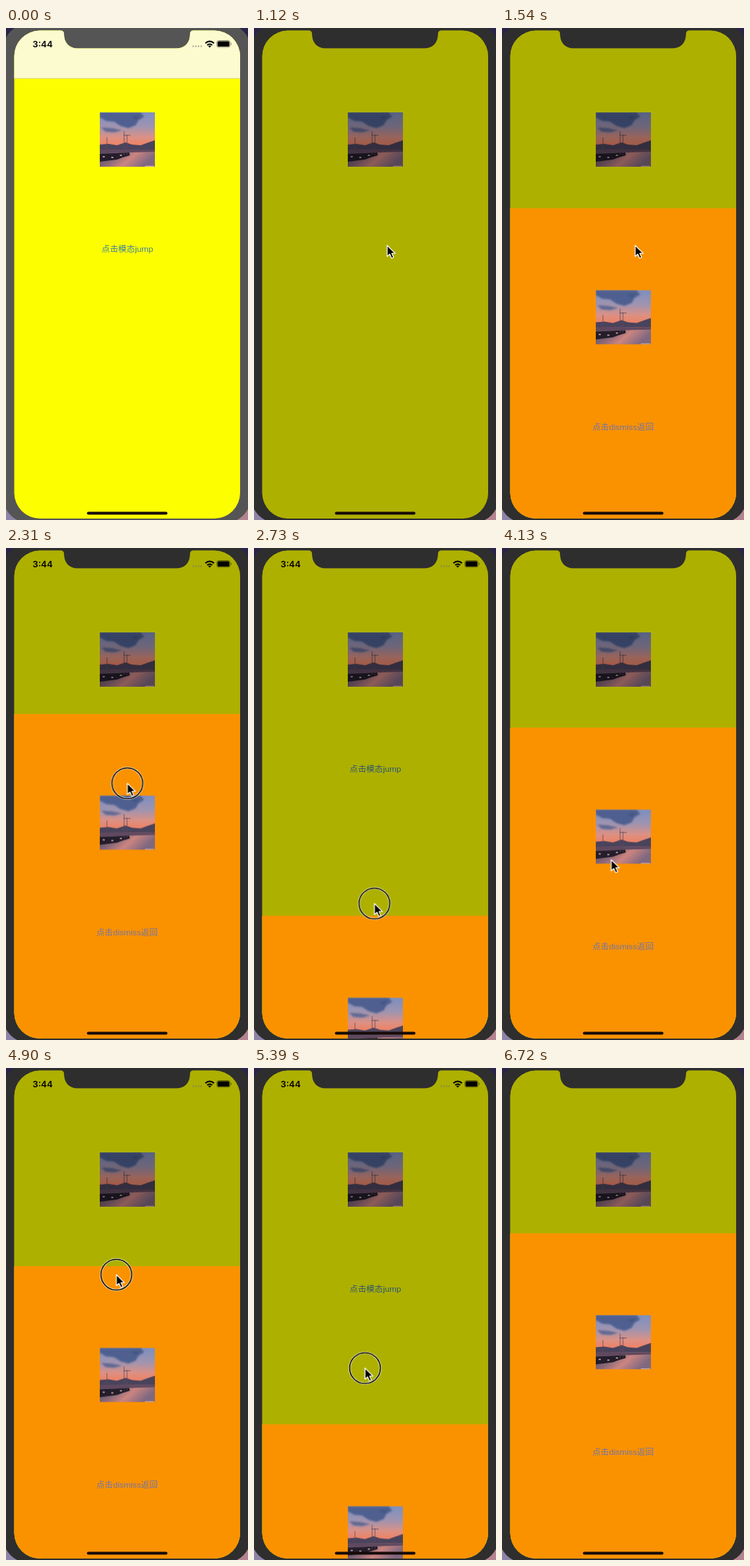
An HTML page that plays this animation: 338 px wide and 688 px high, repeating every 6.79 s.

```html
<!DOCTYPE html>
<html lang="zh-CN">
<head>
<meta charset="utf-8">
<title>Modal drag</title>
<style>
  html, body { margin: 0; width: 100%; height: 100%; overflow: hidden; background: #2a2448; }
  svg { display: block; }
  .label { font: 11.7px "Liberation Sans", "Noto Sans CJK SC", "Noto Sans CJK", sans-serif; text-anchor: middle; }
  .clock { font: 600 12.4px Inter, "Liberation Sans", sans-serif; }

  /* All parts share one 6790 ms loop. */
  .bezel, .nav, .dim, .status, .jump, .ring { animation: 6790ms step-end infinite; }
  .sheet, .pointer { animation: 6790ms linear infinite; }
  .bezel { animation-name: bezel; }
  .nav { animation-name: nav; }
  .dim { animation-name: dim; }
  .status { animation-name: status; }
  .jump { animation-name: jump; }
  .ring { animation-name: ring; }
  .sheet { animation-name: sheet; }
  .pointer { animation-name: pointer; }

  @keyframes bezel { 0% { fill: #555; } 7.2%, 100% { fill: #2e2e2e; } }
  @keyframes nav {
    0%, 45.36% { opacity: 1; }
    16.35%, 54.49%, 100% { opacity: 0; }
  }
  @keyframes dim {
    0%, 45.36% { opacity: 0; }
    16.35%, 54.49%, 100% { opacity: .31; }
  }
  @keyframes status {
    0%, 33.5%, 70.7% { opacity: 1; }
    16.35%, 54.49%, 83%, 100% { opacity: 0; }
  }
  @keyframes jump {
    0%, 33.5%, 70.7% { opacity: 1; }
    14.3%, 51.5% { opacity: .22; }
    16.35%, 54.49%, 83%, 100% { opacity: 0; }
  }
  @keyframes ring {
    0%, 15.4%, 42.42%, 53%, 82.47%, 100% { opacity: 0; }
    14.3%, 33%, 51.5%, 69.7% { opacity: 1; }
  }
  @keyframes sheet {
    0% { transform: translateY(457px); }
    16.5% { transform: translateY(457px); animation-timing-function: ease-in-out; }
    23.8%, 33.4% { transform: translateY(0); }
    34.02% { transform: translateY(.6px); animation-timing-function: ease-in-out; }
    42.42% { transform: translateY(330px); animation-timing-function: ease-out; }
    45.36% { transform: translateY(457px); }
    54.64% { transform: translateY(457px); animation-timing-function: ease-in-out; }
    61.92%, 70.69% { transform: translateY(0); }
    79.38% { transform: translateY(267px); }
    82.47% { transform: translateY(310px); animation-timing-function: ease-out; }
    87.6%, 100% { transform: translateY(0); }
  }
  @keyframes pointer {
    0%, 5% { transform: translate(360px, 470px); animation-timing-function: ease-out; }
    12%, 24% { transform: translate(186px, 304px); animation-timing-function: ease-in-out; }
    31%, 34.02% { transform: translate(169.5px, 329px); animation-timing-function: ease-in-out; }
    42.42% { transform: translate(168px, 525px); }
    44% { transform: translate(168px, 525px); animation-timing-function: ease-in-out; }
    50%, 54.5% { transform: translate(177px, 306px); animation-timing-function: ease-in-out; }
    60.82% { transform: translate(152.5px, 436px); animation-timing-function: ease-in-out; }
    67%, 70.69% { transform: translate(154px, 262px); }
    79.38% { transform: translate(155px, 419.5px); }
    82.47%, 86% { transform: translate(156px, 445px); animation-timing-function: ease-in; }
    92.8%, 100% { transform: translate(360px, 380px); }
  }
</style>
</head>
<body>
<svg width="338" height="688" viewBox="0 0 338 688">
  <defs>
    <clipPath id="screen">
      <path d="M47 3.5H76Q81 3.5 81 8.5C81 20.5 88 28.5 100 28.5H238C250 28.5 257 20.5 257 8.5Q257 3.5 262 3.5H291A36 36 0 0 1 327 39.5V650A36 36 0 0 1 291 686H47.5A36 36 0 0 1 11.5 650V39.5A36 36 0 0 1 47 3.5Z"/>
    </clipPath>
    <linearGradient id="sky" x2="0" y2="1">
      <stop stop-color="#7d8fc0"/>
      <stop offset=".4" stop-color="#a094b0"/>
      <stop offset=".7" stop-color="#dd9184"/>
      <stop offset="1" stop-color="#f47c58"/>
    </linearGradient>
    <linearGradient id="water" x2="1" y2=".35">
      <stop stop-color="#54485f"/>
      <stop offset=".4" stop-color="#8c6a78"/>
      <stop offset=".65" stop-color="#cb8580"/>
      <stop offset="1" stop-color="#806880"/>
    </linearGradient>
    <filter id="soft"><feGaussianBlur stdDeviation="1"/></filter>
    <symbol id="photo" viewBox="0 0 77 76" width="77" height="76">
      <rect width="77" height="50" fill="url(#sky)"/>
      <g filter="url(#soft)">
        <path d="M0 0H57L62 6 54 11 50 18 40 22 29 19 20 13 9 12 0 7Z" fill="#4f6190"/>
        <path d="M2 21L17 22 31 25 20 28 8 27Z" fill="#626a94"/>
        <path d="M44 6L56 5 50 10Z" fill="#425480"/>
      </g>
      <path d="M0 45L12 44 24 46 36 42 45 45 57 46 68 42 77 39V53H0Z" fill="#4a435c"/>
      <rect y="52" width="77" height="24" fill="url(#water)"/>
      <path d="M0 52H77V55L44 56 0 57Z" fill="#60495f"/>
      <path d="M0 58L22 57 41 56 42 60 32 63 24 66 0 69Z" fill="#241d2b"/>
      <g stroke="#5d4b5f" stroke-width=".8" fill="none">
        <path d="M10 35V57M34 26V60M38 31V59M33 32H43"/>
      </g>
      <path d="M4 62h3M16 63h3M28 60h3" stroke="#d6aca0" stroke-width="1.4"/>
      <path d="M63 75.3H76" stroke="#e5bfb5"/>
    </symbol>
  </defs>

  <rect y="640" width="170" height="48" fill="#8d84a6"/>
  <rect x="170" y="640" width="168" height="48" fill="#b3838f"/>
  <rect class="bezel" x="-4" y="-6" width="346" height="698" rx="36"/>

  <g clip-path="url(#screen)">
    <rect width="338" height="688" fill="#fdff00"/>
    <use href="#photo" x="131" y="118"/>
    <text class="label jump" x="169.5" y="312.5" fill="#4080a0">点击模态jump</text>
    <g class="nav">
      <rect width="338" height="70" fill="#fcfbd0"/>
      <rect y="70" width="338" height="1" fill="#dcdc82"/>
    </g>
    <rect class="dim" width="338" height="688"/>

    <g class="status">
      <text class="clock" x="37" y="27">3:44</text>
      <path d="M261.5 25.5H273" stroke="#777" stroke-opacity=".55" stroke-width="2.4" stroke-linecap="round" stroke-dasharray="0 3.7"/>
      <path d="M278.5 21.3Q284.5 16 290.5 21.3M281 24Q284.5 21 288 24" fill="none" stroke="#000" stroke-width="2"/>
      <path d="M282.3 25.3Q284.5 23.8 286.7 25.3L284.5 27.5Z"/>
      <rect x="294.5" y="17.5" width="18.5" height="9.5" rx="2.6" fill="none" stroke="#000" stroke-opacity=".4"/>
      <rect x="295.5" y="18.5" width="16.5" height="7.5" rx="1.6"/>
      <path d="M314.3 20.5V24" stroke="#000" stroke-opacity=".4"/>
    </g>

    <g class="sheet">
      <rect y="231.2" width="338" height="457" fill="#fa9200"/>
      <use href="#photo" x="131" y="345.5"/>
      <text class="label" x="169" y="541" fill="#7474a8">点击dismiss返回</text>
    </g>
    <rect x="113" y="676.5" width="112.5" height="4" rx="2" fill="#160a08"/>
  </g>

  <g class="pointer">
    <g class="ring" fill="none">
      <circle r="21.5" stroke="#fff" stroke-opacity=".75" stroke-width="3.2"/>
      <circle r="21.5" stroke="#000" stroke-width="1.6"/>
    </g>
    <path d="M0 0V15.5L3.6 12.2 6.2 18 9 16.8 6.5 11.2H11.2Z" stroke="#fff" stroke-width="1.2" stroke-linejoin="round"/>
  </g>
</svg>
</body>
</html>
```
